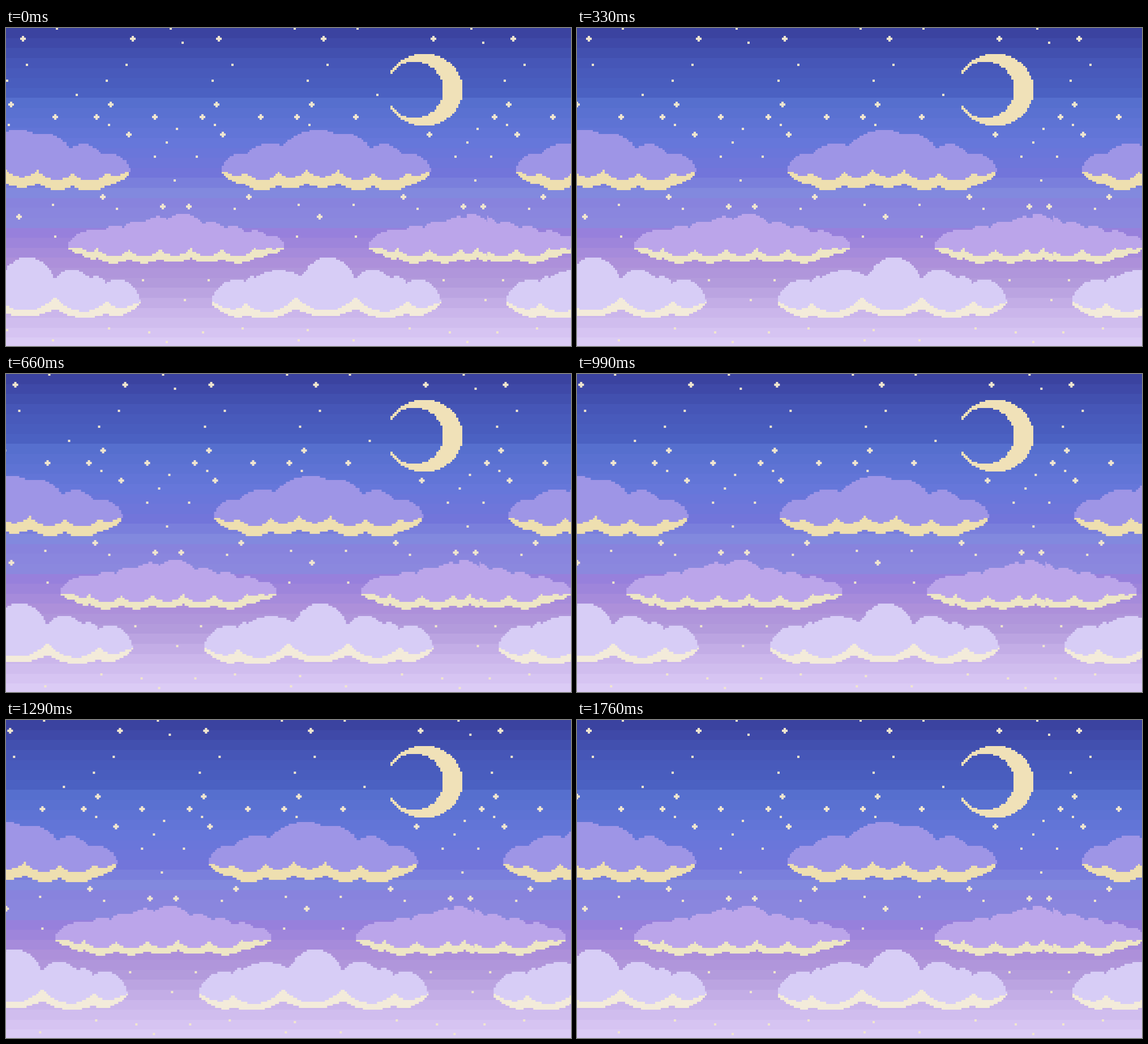
An HTML page with a canvas that plays this animation: 998 by 561 pixels, repeating every 2090 ms.

```html
<!DOCTYPE html>
<html>
<head>
<meta charset="utf-8">
<title>Pixel night sky</title>
<style>
html, body { margin: 0; width: 100%; height: 100%; overflow: hidden; background: #3b43a0 }
canvas { display: block }
</style>
</head>
<body>
<canvas id="stage" width="998" height="561"></canvas>
<script>
const W = 998, H = 561, TILE = 531, CELL = 3.525;
const stage = document.getElementById('stage').getContext('2d');

function layer(width) {
  const c = document.createElement('canvas');
  c.width = width;
  c.height = H;
  return c.getContext('2d');
}

// Edges snap to whole pixels, so neighbouring boxes leave no gaps.
function box(g, x0, y0, x1, y1) {
  const x = Math.round(x0), y = Math.round(y0);
  g.fillRect(x, y, Math.round(x1) - x, Math.round(y1) - y);
}

const snap = v => Math.round(v / CELL) * CELL;
const mix = (a, b, t) => a + (b - a) * t;

// ---- sky: 32 bands blended between key colours ----
const sky = layer(W);
const stops = [
  [0, 0x3b43a0], [3, 0x4656b7], [6, 0x4b61c2], [7, 0x566fce], [11, 0x6677da],
  [14, 0x7275da], [16, 0x8289de], [17, 0x8883dd], [19, 0x8b88de], [20, 0x9780dc],
  [23, 0xad90da], [25, 0xb39bdc], [28, 0xcbb6eb], [31, 0xdbcbf5]
];

function bandColour(i) {
  const k = Math.max(1, stops.findIndex(s => s[0] >= i));
  const [i0, c0] = stops[k - 1], [i1, c1] = stops[k];
  const part = n => Math.round(mix(c0 >> n & 255, c1 >> n & 255, (i - i0) / (i1 - i0)));
  return `rgb(${part(16)}, ${part(8)}, ${part(0)})`;
}

for (let i = 0; i < 32; i++) {
  sky.fillStyle = bandColour(i);
  box(sky, 0, i * 5 * CELL, W, (i + 1) * 5 * CELL);
}

// ---- moon: a disc with a round bite ----
const moon = { x: 738, y: 109 };
sky.fillStyle = '#f0e1b8';
for (let y = 45.5; y < 172; y += CELL) {
  for (let x = 679; x < 806; x += CELL) {
    const cx = x + CELL / 2, dy = y + CELL / 2 - moon.y;
    const disc = Math.hypot((cx - moon.x) / 68.5, dy / 64) < 1;
    const bite = Math.hypot(cx - 721.5, dy) < 50;
    if (disc && !bite) box(sky, x, y, x + CELL, y + CELL);
  }
}

// ---- stars: one patch of sky, repeated to the right ----
const drift = layer(W + 40);
const crosses = {
  19: [30, 224, 376], 135: [9, 185], 157: [87, 160, 263, 514], 188: [217, 383],
  298: [171, 429], 315: [277, 323], 333: [23]
};
const dots = {
  1.5: [90, 291, 510], 26: [312], 65: [37, 213], 93: [2, 178], 118: [125],
  171: [5, 182], 178: [302], 202: [284], 227: [263, 337], 269: [298],
  312: [83, 517], 319: [196, 404], 368: [87, 514], 445: [242, 358], 480: [316],
  530: [182, 418], 533: [2], 537: [253, 348], 551: [83, 517], 554: [284]
};

function dot(x, y) {
  const r = CELL / 2;
  box(drift, x - r, y - r, x + r, y + r);
}

function cross(x, y) {
  const a = CELL * 1.5, b = CELL / 2;
  box(drift, x - a, y - b, x + a, y + b);
  box(drift, x - b, y - a, x + b, y + a);
}

function repeats(x, y) {
  if (x > 320) return [0, 520];
  const beside = y > 60 && y < 175 && x > 150;
  return beside ? [0, 187, 703] : [0, TILE];
}

function scatter(rows, draw) {
  for (const row in rows) for (const x of rows[row]) {
    const y = +row;
    for (const dx of repeats(x, y)) {
      if (Math.hypot(x + dx - moon.x, y - moon.y) > 74) draw(x + dx, y);
    }
  }
}

drift.fillStyle = '#f0e5cf';
scatter(crosses, cross);
scatter(dots, dot);

// ---- clouds: puffs are [centre, half width, top]; the rim hangs between points ----
const clouds = [
  {
    fill: '#9e95e6', rim: '#eedfb0', thick: 24, base: 252,
    puffs: [[415, 34, 222], [468, 55, 204], [551, 77, 180], [601, 55, 187],
      [667, 40, 205], [708, 42, 221]],
    points: [[381, 252], [423, 254], [482, 254], [531, 250], [586, 250],
      [649, 255], [709, 255], [750, 252]]
  },
  {
    fill: '#bba5ea', rim: '#eee6c5', thick: 18, base: 386,
    puffs: [[160, 50, 356], [193, 30, 348], [230, 36, 341], [268, 38, 333], [313, 50, 328],
      [362, 36, 342], [400, 32, 349], [440, 28, 357], [468, 24, 366]],
    points: [[110, 386], [131, 387], [161, 389], [217, 390], [272, 389], [326, 388],
      [381, 390], [440, 388], [462, 386], [491, 386]]
  },
  {
    fill: '#d7cdf6', rim: '#f3ebda', thick: 22, base: 485,
    puffs: [[408, 44, 444], [435, 20, 438], [482, 65, 427], [569, 57, 405],
      [648, 45, 426], [689, 28, 438], [728, 40, 444]],
    points: [[364, 484], [424, 484], [512, 473], [617, 473], [709, 481], [768, 484]]
  }
];

function topAt({ puffs, base }, x) {
  return Math.min(...puffs.map(([cx, half, top]) => {
    const u = Math.min(1, Math.abs(x - cx) / half);
    return mix(base, top, Math.sqrt(1 - u * u));
  }));
}

// Upper and lower edge of the rim at x.
function rimAt({ points, thick }, x) {
  const k = Math.max(1, points.findIndex(p => p[0] >= x));
  const [x0, y0] = points[k - 1], [x1, y1] = points[k];
  const gap = x1 - x0, t = (x - x0) / gap, arc = 4 * t * (1 - t);
  const line = mix(y0, y1, t);
  const edge = Math.min(x - points[0][0], points[points.length - 1][0] - x);
  const taper = Math.sqrt(Math.min(1, edge / 50));
  return [
    line + gap * 0.24 * arc ** 0.8 * taper,
    line + (thick + gap * 0.13 * arc) * taper
  ];
}

function cloud(g, shape, dx) {
  const { points, fill, rim } = shape;
  const end = points[points.length - 1][0];
  for (let x = points[0][0]; x + CELL / 2 < end; x += CELL) {
    const c = x + CELL / 2;
    const [upper, lower] = rimAt(shape, c).map(snap);
    const left = x + dx, right = left + CELL;
    g.fillStyle = fill;
    box(g, left, Math.min(upper, snap(topAt(shape, c))), right, upper);
    g.fillStyle = rim;
    box(g, left, upper, right, lower);
  }
}

const tile = layer(TILE);
for (const shape of clouds) {
  cloud(tile, shape, -TILE);
  cloud(tile, shape, 0);
}

// The tile is laid in strips with visible seams: [from, to, shift].
for (const [from, to, shift] of [[0, 531, 0], [531, 814, 531], [814, 850, 506], [850, 1038, 520]]) {
  const w = to - from;
  drift.drawImage(tile.canvas, from - shift, 0, w, H, from, 0, w, H);
}

// ---- playback: the layer steps left and back ----
const ends = [330, 660, 990, 1490, 1760, 2090];
const shifts = [0, -9, -13.5, -22.7, -13.5, -9];

function frame(now) {
  const t = now % 2090;
  stage.drawImage(sky.canvas, 0, 0);
  stage.drawImage(drift.canvas, shifts[ends.findIndex(end => t < end)], 0);
  requestAnimationFrame(frame);
}
frame(0);
</script>
</body>
</html>
```
